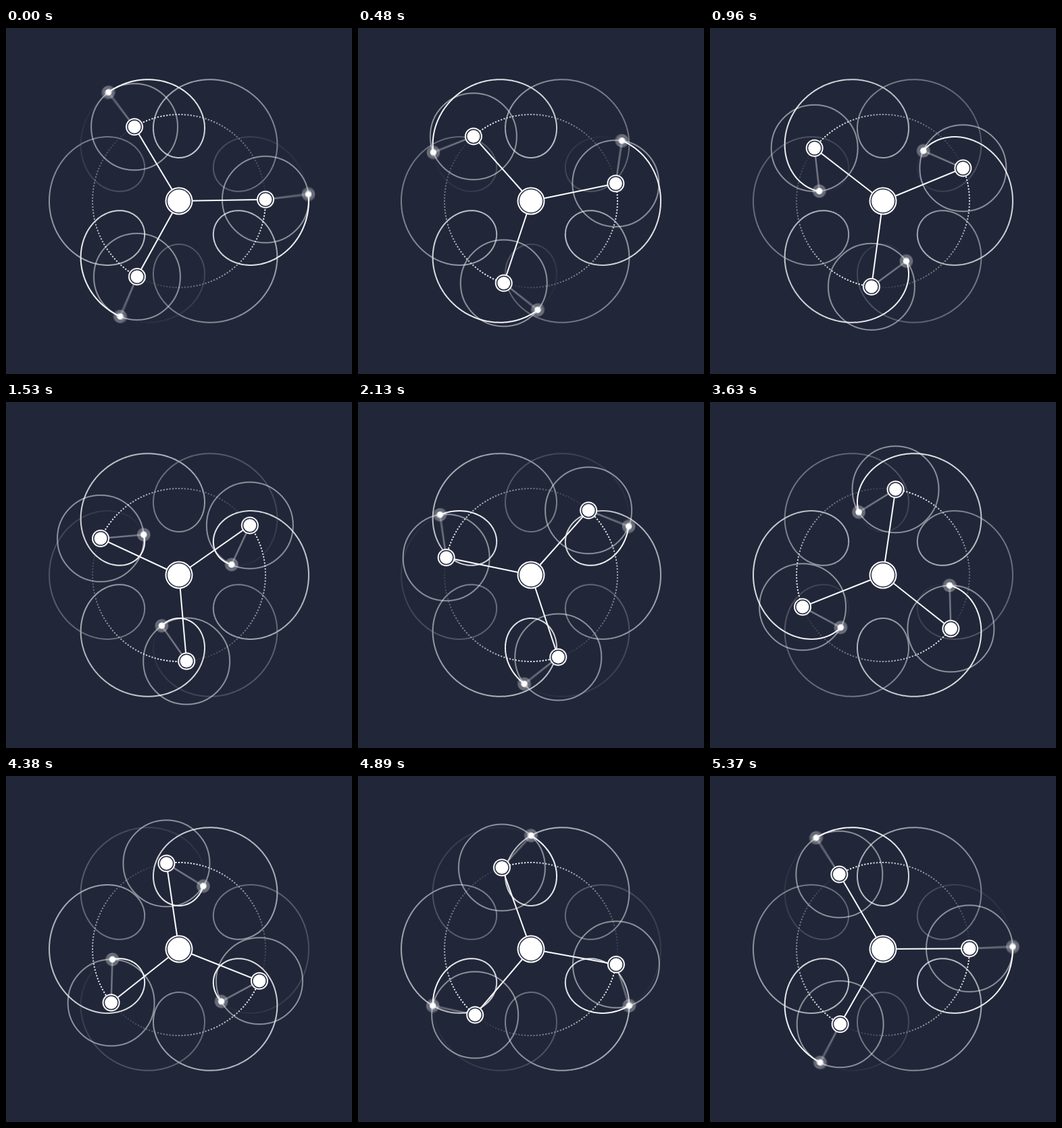
Write an HTML page with a canvas that moves like this. It is 512x512 px and loops after 5.4 s.

```html
<!DOCTYPE html>
<html lang="en">
<head>
<meta charset="utf-8">
<title>Epicycles</title>
<style>
  html, body { margin: 0; width: 100%; height: 100%; overflow: hidden; background: #212639; }
  canvas { display: block; width: 512px; height: 512px; }
</style>
</head>
<body>
<canvas id="stage" width="512" height="512"></canvas>
<script>
const SIZE = 512, MID = 256, R = 128, r = 64;
const LOOP = 5400, STEP = 30, STEPS = LOOP / STEP;
const ARMS = 3, SPIN = 7, SPAN = 120;
const SAMPLES = 6, SHUTTER = 0.6;
const BG = [33, 38, 57];
const bg = `rgb(${BG})`, white = '#fff';

const stage = document.getElementById('stage').getContext('2d');
const newLayer = () => {
  const c = document.createElement('canvas');
  c.width = c.height = SIZE;
  return c.getContext('2d');
};
const trails = newLayer(), scene = newLayer();

const rad = deg => deg * Math.PI / 180;
const polar = ([x, y], radius, deg) =>
  [x + radius * Math.cos(rad(deg)), y - radius * Math.sin(rad(deg))];
const center = [MID, MID];
const armAt = deg => polar(center, R, deg);
const tipAt = deg => polar(armAt(deg), r, SPIN * deg);
const glow = k => `rgb(${BG.map(c => Math.round(c + (255 - c) * k))})`;
const veil = a => `rgba(255,255,255,${a})`;

function line(g, from, to, color, width = 2) {
  g.strokeStyle = color;
  g.lineWidth = width;
  g.beginPath();
  g.moveTo(...from);
  g.lineTo(...to);
  g.stroke();
}

function disc(g, [x, y], radius, color) {
  g.fillStyle = color;
  g.beginPath();
  g.arc(x, y, radius, 0, 2 * Math.PI);
  g.fill();
}

function ring(g, [x, y], radius, color) {
  g.strokeStyle = color;
  g.lineWidth = 2;
  g.beginPath();
  g.arc(x, y, radius, 0, 2 * Math.PI);
  g.stroke();
}

function node(g, at, outer, gap, inner) {
  disc(g, at, outer, white);
  disc(g, at, gap, bg);
  disc(g, at, inner, white);
}

// Each trail fades over the 120 degrees behind its head.
function drawTrails(angle) {
  const g = trails;
  g.globalCompositeOperation = 'source-over';
  g.fillStyle = bg;
  g.fillRect(0, 0, SIZE, SIZE);
  g.globalCompositeOperation = 'lighten';
  for (let k = 0; k < ARMS; k++) {
    const head = angle + k * SPAN;
    for (let age = SPAN; age > 0; age -= 0.5) {
      line(g, tipAt(head - age), tipAt(head - age + 0.54), glow(1 - age / SPAN));
    }
    // Dots sit at fixed places on the circle, every two degrees.
    for (let d = 2 * Math.floor(head / 2); d > head - SPAN; d -= 2) {
      line(g, armAt(d - 0.5), armAt(d + 0.5), glow(1 - (head - d) / SPAN));
    }
  }
}

function drawScene(angle) {
  const g = scene;
  g.drawImage(trails.canvas, 0, 0);
  for (let k = 0; k < ARMS; k++) {
    const deg = angle + k * SPAN, arm = armAt(deg), tip = tipAt(deg);
    ring(g, arm, r, veil(0.5));
    line(g, arm, tip, veil(0.38), 2.5);
    line(g, center, arm, white);
    node(g, arm, 13, 11, 9.5);
    disc(g, tip, 10, veil(0.32));
    disc(g, tip, 4.8, white);
  }
  node(g, center, 20.5, 18.5, 17);
}

// Averages several moments within a step for motion blur.
function render(step) {
  const stepAngle = SPAN / STEPS;
  const angle = 1 + step * stepAngle;
  drawTrails(angle);
  for (let i = 0; i < SAMPLES; i++) {
    drawScene(angle + ((i + 0.5) / SAMPLES - 0.5) * SHUTTER * stepAngle);
    stage.globalAlpha = 1 / (i + 1);
    stage.drawImage(scene.canvas, 0, 0);
  }
}

const start = performance.now();
let shown = -1;
function tick() {
  const t = performance.now() - start;
  const step = Math.floor((t + 8) / STEP) % STEPS;
  if (step !== shown) render(shown = step);
  requestAnimationFrame(tick);
}
tick();
</script>
</body>
</html>
```
